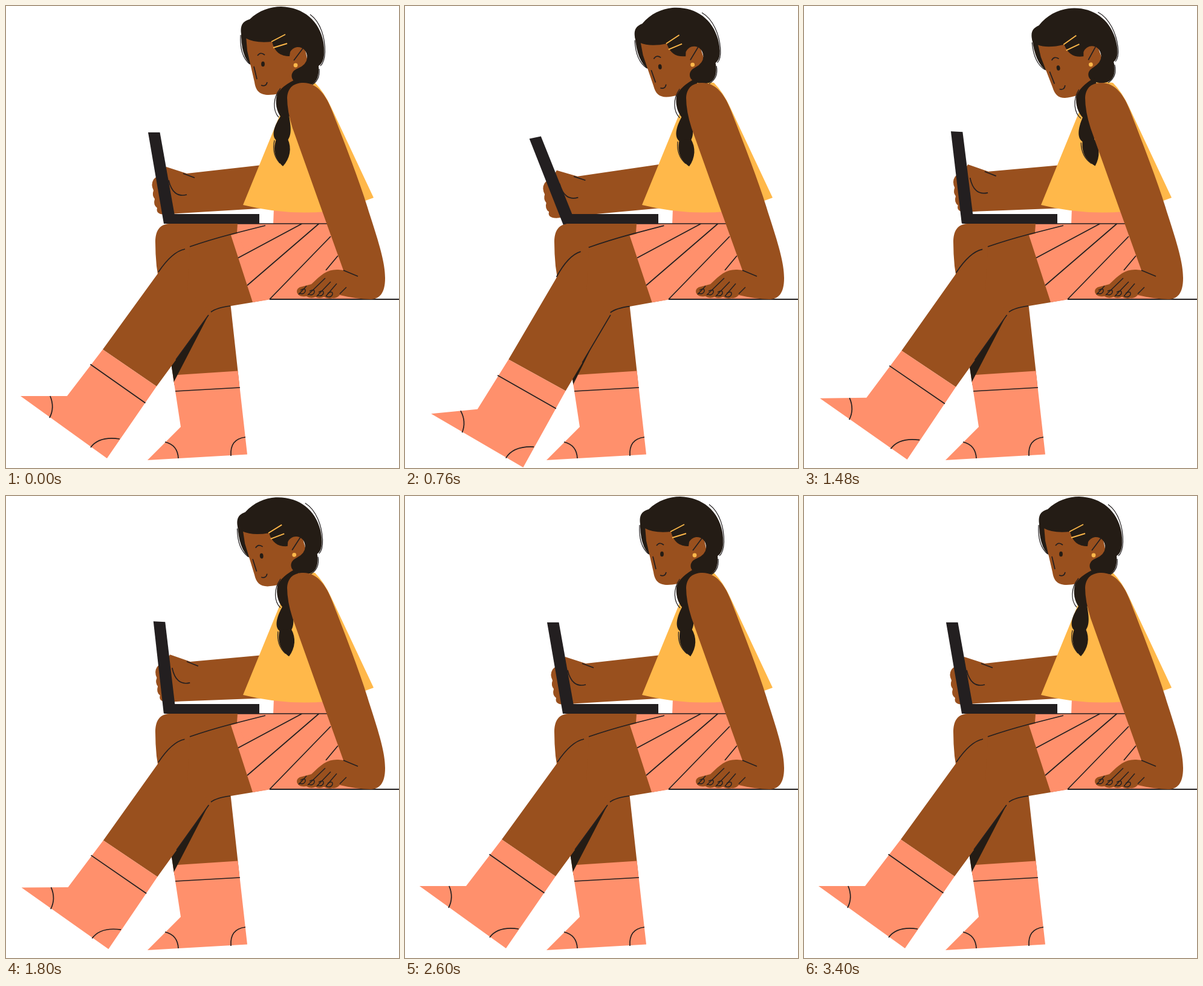
Animation, 650 px wide and 764 px high, one loop 3.6 s. Source, as an HTML page with a canvas:

```html
<!DOCTYPE html>
<html lang="en">
<head>
<meta charset="utf-8">
<title>Girl with laptop</title>
<style>
  html, body { margin: 0; width: 100%; height: 100%; overflow: hidden; background: #fff; }
  canvas { display: block; }
</style>
</head>
<body>
<canvas id="stage" width="650" height="764"></canvas>
<script>
const ctx = document.getElementById('stage').getContext('2d');
const SKIN = '#99501e', HAIR = '#241c15', INK = '#231f20', PINK = '#ff906c', GOLD = '#ffb84a';
const LOOP = 3600, REST = 3400, TICK = 40;

const fill = (d, color) => { ctx.fillStyle = color; ctx.fill(new Path2D(d)); };

function line(d, color = INK, width = 1.7) {
  ctx.strokeStyle = color;
  ctx.lineWidth = width;
  ctx.stroke(new Path2D(d));
}

function dot(x, y, rx, ry, color) {
  ctx.fillStyle = color;
  ctx.beginPath();
  ctx.ellipse(x, y, rx, ry, 0, 0, Math.PI * 2);
  ctx.fill();
}

function turn(x, y, deg, draw) {
  ctx.save();
  ctx.translate(x, y);
  ctx.rotate(deg * Math.PI / 180);
  ctx.translate(-x, -y);
  draw();
  ctx.restore();
}

// Eased keyframes: [time, value] pairs
function track(keys, t) {
  for (let i = 1; i < keys.length; i++) {
    const [t0, a] = keys[i - 1], [t1, b] = keys[i];
    if (t <= t1) {
      const p = (t - t0) / (t1 - t0);
      return a + (b - a) * p * p * (3 - 2 * p);
    }
  }
  return keys[keys.length - 1][1];
}

// Smooth curve through evenly spaced values
function spline(v, step, t) {
  const at = k => v[Math.max(0, Math.min(v.length - 1, k))];
  const i = Math.floor(t / step), p = t / step - i;
  const a = at(i - 1), b = at(i), c = at(i + 1), d = at(i + 2);
  return b + 0.5 * p * (c - a + p * (2 * a - 5 * b + 4 * c - d + p * (3 * (b - c) + d - a)));
}

const SHIN = [[0, 0], [400, 8.1], [800, -5.9], [1200, 3.9], [1600, -2], [2000, 1], [2400, 0]];
const THIGH = [[0, 0], [400, 2.6], [800, -0.6], [1200, 0]];
const SCREEN = [[0, 0], [800, -11.8], [1600, 4], [2400, 0]];
const REACH = [[0, 0], [800, -13.2], [1600, 6.5], [2400, 0]];
const FOREARM = [[0, 0], [800, -1.9], [1600, 1.5], [2400, 0]];
const HEAD = [[0, 0], [1200, -8.4], [1400, -8.4], [2240, 1], [2560, 0]];
const BRAID = [0, -0.7, -2, -3.5, -5.6, -8.6, -11.5, -11.2, -8, -4.3, -2.2, -4, -6.6, -6.1, -2.5, 1, 1.5, 0];

const FAR_LEG = 'M384 360H270C253 361 247 373 247 391Q247 410 249 430L278.500 627H386L371 490L400 470Z';

function backArm() {
  fill('M265 266L299 277L450 260V333L285 343L262 345Q247 344 250 334Q243 329 246 319Q241 313 244 305Q239 295 244 287Q248 281 256 281Z', SKIN);
  line('M269 288Q276 318 299 312M293 277L312 284');
}

function torso() {
  fill('M443 334H527L533 361H442Z', PINK);
  fill('M392 329L469 141L486 124L511 127Q526 142 538 168L608 317Q572 331 530 340Q460 346 392 329Z', GOLD);
}

function farLeg(lift) {
  fill(FAR_LEG, SKIN);
  fill('M276 610.500L383.500 603.500L399 741.500L234 751L289 696Z', PINK);
  line('M280 637L387 631M263 721Q284 726 285 748M372 744Q370 716 396 713');
  // Shade behind the near calf
  const k = lift / 2.6;
  ctx.save();
  ctx.clip(new Path2D(FAR_LEG));
  fill(`M${335 + 6 * k} ${511 - 12 * k}L${277.5 - 3.5 * k} ${622 - 20 * k}L250 ${575 - 20 * k}L300 500Z`, HAIR);
  ctx.restore();
}

function shin() {
  fill('M160 568L250 444Q271 411 296 402L350 410L360 480Q342 502 334 513L249 629Z', SKIN);
  fill('M160 568L249 629L167 748L24 645H101Z', PINK);
  line('M139.500 592.500L230.500 656.500M73 645Q81 664 72 681M140 730Q154 711 188 716');
  line('M296 402Q275 406 252 440M335 511L281 585');
}

function nearLeg(lift, swing) {
  turn(447, 422, lift, () => {
    turn(325, 463, swing - lift, shin);
    fill('M304 399L372 379L420 390L430 486L408 490L372 496Q348 499 339 506L300 470Z', SKIN);
    line('M371 496Q348 499 339 506');
    fill('M372 379L428 364L470 420L480 484.500L436 485.500L408 490Z', PINK);
  });
  fill('M383 360H550L600 485H437L418 470L386 381L382 375Z', PINK);
  turn(447, 422, lift, () => line('M304 398Q336 387 372 377.500L429 363'));
  line('M383 360H531M489.500 360L384 416.500M517.500 360L399 462M537 381L436 485M549 413L529 437');
}

function head() {
  // Back hair, face, then fringe and bun
  fill('M389 42Q388 82 405 98L410 60Z', HAIR);
  fill('M397 50L399 74L411 126C414 146 425 150 452 145L480 128L500 96L490 50L440 40Z', SKIN);
  fill('M389 46C387 30 393 25 403 22C418 7 438 1 455 1C492 2 519 25 525 60C528 80 526 94 517 99C519 118 512 131 498 131C480 131 470 122 473 112Q475 106 483 103Q497 97 498 86C499 67 478 62 470 76L469 83C454 83 444 76 440 59Q412 62 396 53Z', HAIR);
  line('M388 48Q386 82 403 96', INK, 1.200);
  line('M503 14C521 27 528 54 527.500 76Q527 93 520 99M518 104Q520 124 503 132', INK, 1.200);
  line('M439 59L462 47M442 69L465 62', GOLD, 1.900);
  line('M476 90L491 70M410 100L415 121M416 82Q421 75 428 81M422 131Q430 134 432 126');
  dot(425, 96, 2.9, 4.3, HAIR);
  dot(479, 98, 3.4, 3.4, GOLD);
}

// Three knots, each bending a little more than the one above
function braid(bend) {
  turn(470, 132, bend * 0.75, () => {
    fill('M482 120Q455 132 448 147C445 160 447 174 455 184L468 183L490 160Z', HAIR);
    line('M454 136C441 152 441 173 451 184', INK, 1.200);
    turn(461, 183, bend * 0.25, () => {
      fill('M455 181C446 194 437 213 447 222H466C474 211 470 194 468 180Z', HAIR);
      turn(456, 221, bend * 0.3, () => {
        fill('M447 220C441 237 444 253 458 265C470 252 473 235 466 220Z', HAIR);
        line('M444 222Q439 245 453 260', INK, 1.200);
      });
    });
  });
}

function frontArm() {
  fill('M465 152C466 134 477 127 492 127C515 127 530 148 540 175C568 247 588 300 600 340C618 395 627 425 627 450C627 475 618 485 602 485Q582 485 552 478Q547 484 540 483Q532 485 526 481Q518 485 512 481Q504 485 497 480C482 483 476 470 486 465L505 460C525 441 534 433 558 437L520 331L474 202Q465 174 465 152Z', SKIN);
  line('M558 437L582 447M497 463L484 477M528 450L499 478M537 456L514 480M547 459L529 480M563 465L552 476', INK, 1.500);
  for (let i = 0; i < 4; i++) {
    const x = 487 + i * 15, y = 475 + i * 1.7;
    line(`M${x} ${y - 5}Q${x + 9} ${y - 10} ${x + 8} ${y - 3}Q${x + 5} ${y + 3} ${x - 2} ${y}`, INK, 1.400);
  }
}

function render(t) {
  const lift = track(THIGH, t);
  ctx.fillStyle = '#fff';
  ctx.fillRect(0, 0, 650, 764);
  ctx.save();
  ctx.translate(track(REACH, t), 0);
  turn(440, 300, track(FOREARM, t), backArm);
  ctx.restore();
  turn(271, 357, track(SCREEN, t), () => fill('M235 209H254.500L280 352V360H261Z', INK));
  fill('M262 344H419V360H262Z', INK);
  torso();
  farLeg(lift);
  nearLeg(lift, track(SHIN, t));
  line('M436 485H650', INK, 2);
  turn(468, 130, track(HEAD, t), head);
  braid(spline(BRAID, 200, t));
  frontArm();
}

const start = performance.now();
function loop() {
  const t = (performance.now() - start) % LOOP;
  render(Math.min(REST, Math.floor(t / TICK) * TICK));
  requestAnimationFrame(loop);
}
loop();
</script>
</body>
</html>
```
